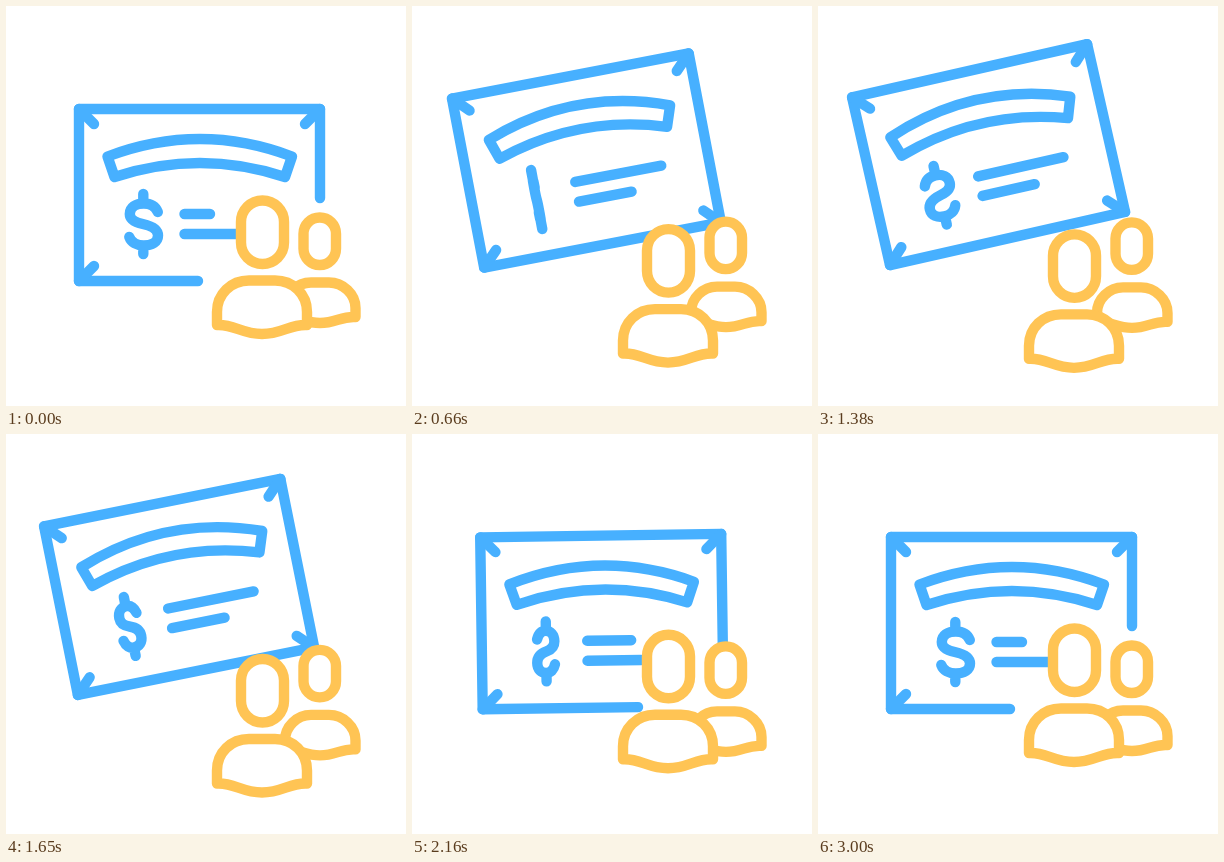
These frames come from a looping animation (400x400 px, 5.03 s). An HTML page:

```html
<!DOCTYPE html>
<html lang="en">
<head>
<meta charset="utf-8">
<title>Certificate and people</title>
<style>
html, body { margin: 0; width: 100%; height: 100%; overflow: hidden; background: #fff; }
svg { display: block; width: 100%; height: 100%; }
g { stroke-width: 10.4; stroke-linecap: round; stroke-linejoin: round; }
#sheet { fill: none; stroke: #47b0ff; }
.person { fill: #fff; stroke: #ffc454; }
</style>
</head>
<body>
<svg viewBox="0 0 400 400">
  <g id="sheet">
    <path id="border"/>
    <path d="M73 103l15 15M314 103l-15 15M73 275l15-15"/>
    <path id="tick"/>
    <path d="M101.5 150.5Q194 115.5 286 150.5L279 171Q194 143 108.5 171Z"/>
    <path id="line"/>
    <path d="M178.5 228H232"/>
    <path id="dollar"/>
  </g>
  <g id="back" class="person">
    <path d="M279 311V302C279 288 291 276.5 305 276.5H323C337 276.5 349.5 288 349.5 302V311C335 310 330 317 314 317S293 310 279 311Z"/>
    <rect x="297.5" y="211.5" width="32.5" height="47.5" rx="16.2"/>
  </g>
  <g id="front" class="person">
    <path d="M211 319V306C211 288 225 274.5 243 274.5H269C287 274.5 301 288 301 306V319C284 318 276 328 256 328S228 318 211 319Z"/>
    <rect x="235" y="194.5" width="43" height="63.5" rx="21.5"/>
  </g>
</svg>
<script>
const LOOP = 5030, ACTIVE = 3000;
const $ = id => document.getElementById(id);

// Progress of t through a span, 0 to 1.
const span = (t, from, length) => Math.min(1, Math.max(0, (t - from) / length));
const smooth = u => u * u * (3 - 2 * u);
// Quick start with a long tail, and slow start with a quick end.
const rise = (t, length) => smooth(1 - (1 - span(t, 0, length)) ** 1.5);
const fall = (t, from, length) => 1 - smooth(span(t, from, length) ** 3);

// The dollar sign turns about its upright axis; its stroke keeps its width.
function dollarPath(k) {
  const p = (x, y) => `${(137.3 + x * k).toFixed(2)} ${y} `;
  return 'M' + p(14.5, 206)
    + 'C' + p(12, 200) + p(7, 197.5) + p(0.5, 197.5)
    + 'C' + p(-7.5, 197.5) + p(-13.5, 201.5) + p(-13.5, 208)
    + 'C' + p(-13.5, 214) + p(-7.5, 216.5) + p(-0.5, 218)
    + 'C' + p(8.5, 220) + p(14.7, 223) + p(14.7, 229.5)
    + 'C' + p(14.7, 236) + p(8.5, 239.5) + p(0.5, 239.5)
    + 'C' + p(-6.5, 239.5) + p(-12, 236.5) + p(-14, 231)
    + 'M137.3 188V197M137.3 240V248';
}

function draw(t) {
  const lift = rise(t, 1120) * fall(t, 650, 1680);
  const reveal = rise(t, 620) * fall(t, 1300, 1000);
  const sway = Math.sin(Math.PI * span(t, 1500, 1500)) ** 2;

  const angle = 1.6 * sway - 13 * lift;
  const x = -lift - 2.2 * sway;
  const y = 1.25 * angle + 1.4 * sway;
  $('sheet').setAttribute('transform', `translate(${x} ${y}) rotate(${angle} 73 275)`);

  const tip = 15 * span(reveal, 0.4, 0.6);
  $('border').setAttribute('d', `M${192 + 122 * reveal} 275H73V103H314V${192 + 83 * reveal}`);
  $('tick').setAttribute('d', tip ? `M314 275l${-tip} ${-tip}` : '');
  $('line').setAttribute('d', `M178.5 208h${25.5 + 62 * reveal}`);

  const u = t / ACTIVE;
  const turns = 3 * (u + 0.38 * u ** 1.5 * (1 - u));
  $('dollar').setAttribute('d', dollarPath(Math.cos(2 * Math.PI * turns)));

  $('back').setAttribute('transform', `translate(0 ${5 * lift})`);
  $('front').setAttribute('transform', `translate(0 ${34.5 * lift})`);
}

const start = performance.now();
function tick() {
  draw(Math.min((performance.now() - start) % LOOP, ACTIVE));
  requestAnimationFrame(tick);
}
tick();
</script>
</body>
</html>
```
